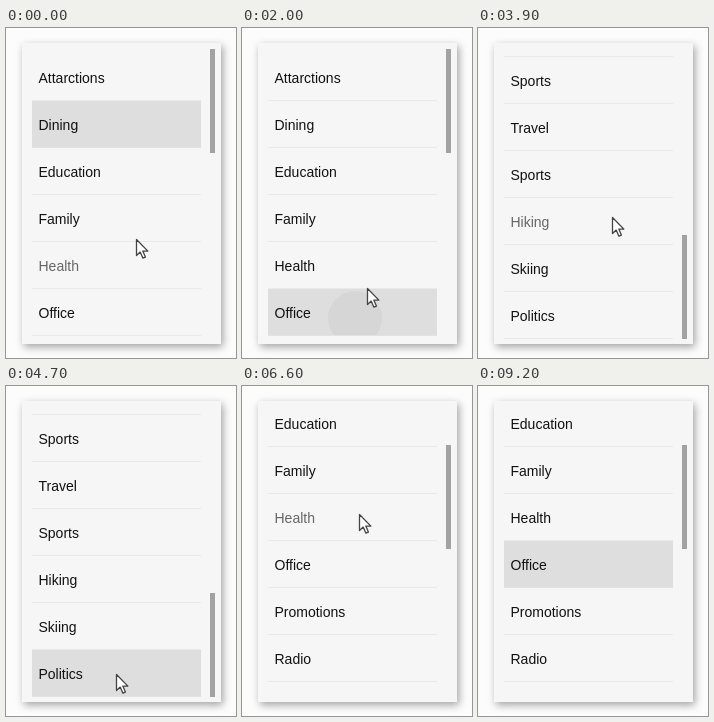
Animation of 230x330 px, one loop 9300 ms. Source, as an HTML page:

```html
<!DOCTYPE html>
<html lang="en">
<head>
<meta charset="utf-8">
<title>List menu</title>
<style>
html, body { margin: 0; width: 100%; height: 100%; overflow: hidden; background: #fcfcfc; }
.panel { position: absolute; left: 16px; top: 15px; width: 199px; height: 301px; background: #f6f6f6; box-shadow: 2px 3px 8px rgba(0, 0, 0, .36); }
.view { position: absolute; left: 26px; top: 21px; width: 169px; height: 290px; overflow: hidden; }
.list { position: absolute; left: 0; top: 5px; width: 169px; margin: 0; padding: 0; list-style: none; font: 14px "Liberation Sans", Arial, sans-serif; }
.list li { position: relative; box-sizing: border-box; height: 47px; padding-left: 6.5px; line-height: 48px; border-bottom: 1px solid #e9e9e9; overflow: hidden; color: #111; }
.list li.on { background: #dedede; border-color: #e2e2e2; }
.list li.dim { color: #666; }
.list span { position: relative; }
.ripple { position: absolute; border-radius: 50%; background: #000; }
.thumb { position: absolute; left: 204px; top: 21px; width: 5px; height: 104px; background: #a2a2a2; }
.cursor { position: absolute; left: 0; top: 0; overflow: visible; }
</style>
</head>
<body>
<div class="panel"></div>
<div class="view"><ul class="list"></ul></div>
<div class="thumb"></div>
<svg class="cursor" width="14" height="22"><path d="M.5 .5V16.5L4.2 13.1L6.9 19.2L9.4 18.1L6.8 12.1H11.9Z" fill="#fff" stroke="#444" stroke-width="1.3" stroke-linejoin="round"/></svg>
<script>
const LOOP = 9300, STEP = 100, MOVE = 700, LAG = 60, HIDE = 8500;
const ROW = 47, LEFT = 26, TOP = 26, MAX = 514, TRAVEL = 186, GRIP = 50;
const names = ['Attarctions', 'Dining', 'Education', 'Family', 'Health', 'Office', 'Promotions', 'Radio',
  'Recipes', 'Retail', 'Shopping', 'Sports', 'Travel', 'Sports', 'Hiking', 'Skiing', 'Politics'];

// Pointer stops: arrival time, x, y
const stops = [
  [-300, 132, 290], [0, 130, 211], [300, 114, 196], [550, 124, 60], [800, 118, 206], [1350, 217, 310],
  [1850, 113, 290], [2000, 125, 260], [2600, 204, GRIP], [3400, 204, GRIP + TRAVEL], [3900, 134, 189],
  [4600, 110, 288], [5500, 116, 129], [6000, 199, GRIP + TRAVEL], [6400, 199, 88.4], [6600, 117, 128], [7500, 100, 180]];
const drags = [[2600, 3400], [6000, 6400]];
const clicks = [300, 1850, 4700, 8200];

const $ = s => document.querySelector(s);
const list = $('.list'), thumb = $('.thumb'), cursor = $('.cursor');
const rows = names.map(name => {
  const li = document.createElement('li'), label = document.createElement('span');
  label.textContent = name;
  li.append(label);
  list.append(li);
  return li;
});
const ripple = document.createElement('div');
ripple.className = 'ripple';

const clamp = v => Math.max(0, Math.min(1, v));
const mix = (a, b, e) => a + (b - a) * e;

// Rest at each stop, then leave in time to reach the next one
function pointer(t) {
  const i = stops.findIndex(s => s[0] > t);
  if (i < 0) return stops[stops.length - 1].slice(1);
  const [t0, x0, y0] = stops[i - 1], [t1, x1, y1] = stops[i];
  const u = clamp(1 - (t1 - t) / Math.min(MOVE, t1 - t0)), e = u * u * (3 - 2 * u);
  return [mix(x0, x1, e), mix(y0, y1, e)];
}

// The thumb follows the pointer while dragged and keeps its place after
function thumbAt(t) {
  const drag = drags.filter(d => d[0] <= t).pop();
  return drag ? pointer(Math.min(t, drag[1]))[1] - GRIP : 0;
}

const scrollAt = t => Math.round(thumbAt(t) / TRAVEL * MAX);
const rowAt = (y, scroll) => Math.floor((y - TOP + scroll) / ROW);

function hovered(t, scroll) {
  const [x, y] = pointer(t - LAG);
  const inside = x > LEFT && x < 195 && y > 21 && y < 311;
  return t < HIDE && inside ? rowAt(y, scroll) : -1;
}

function draw(t) {
  const scroll = scrollAt(t), hover = hovered(t, scroll);
  const [x, y] = pointer(t).map(Math.round);
  const click = clicks.filter(c => c <= t).pop() ?? -LOOP;
  const age = t - click;
  const [px, py] = pointer(Math.max(0, click));
  const on = click < 0 ? 1 : rowAt(py, scrollAt(click));

  list.style.transform = `translateY(${-scroll}px)`;
  thumb.style.transform = `translateY(${Math.round(thumbAt(t))}px)`;
  cursor.style.transform = `translate(${x}px, ${y}px)`;
  cursor.style.visibility = t < HIDE ? 'visible' : 'hidden';

  rows.forEach((li, i) => {
    const lit = i === on;
    li.classList.toggle('on', lit);
    li.classList.toggle('dim', lit && age < 900 && t < HIDE ? age > 250 : i === hover);
  });

  const r = 27 * age / 150, fade = clamp((1000 - age) / 600);
  if (rows[on].firstChild !== ripple) rows[on].prepend(ripple);
  Object.assign(ripple.style, {
    display: fade > 0 ? 'block' : 'none',
    left: px - LEFT - r + 'px',
    top: py - TOP + scrollAt(click) - on * ROW - r + 'px',
    width: 2 * r + 'px',
    height: 2 * r + 'px',
    opacity: .035 * fade
  });
}

const start = performance.now();
function tick() {
  const t = (performance.now() - start) % LOOP;
  draw(Math.floor(t / STEP) * STEP);
  requestAnimationFrame(tick);
}
tick();
</script>
</body>
</html>
```
